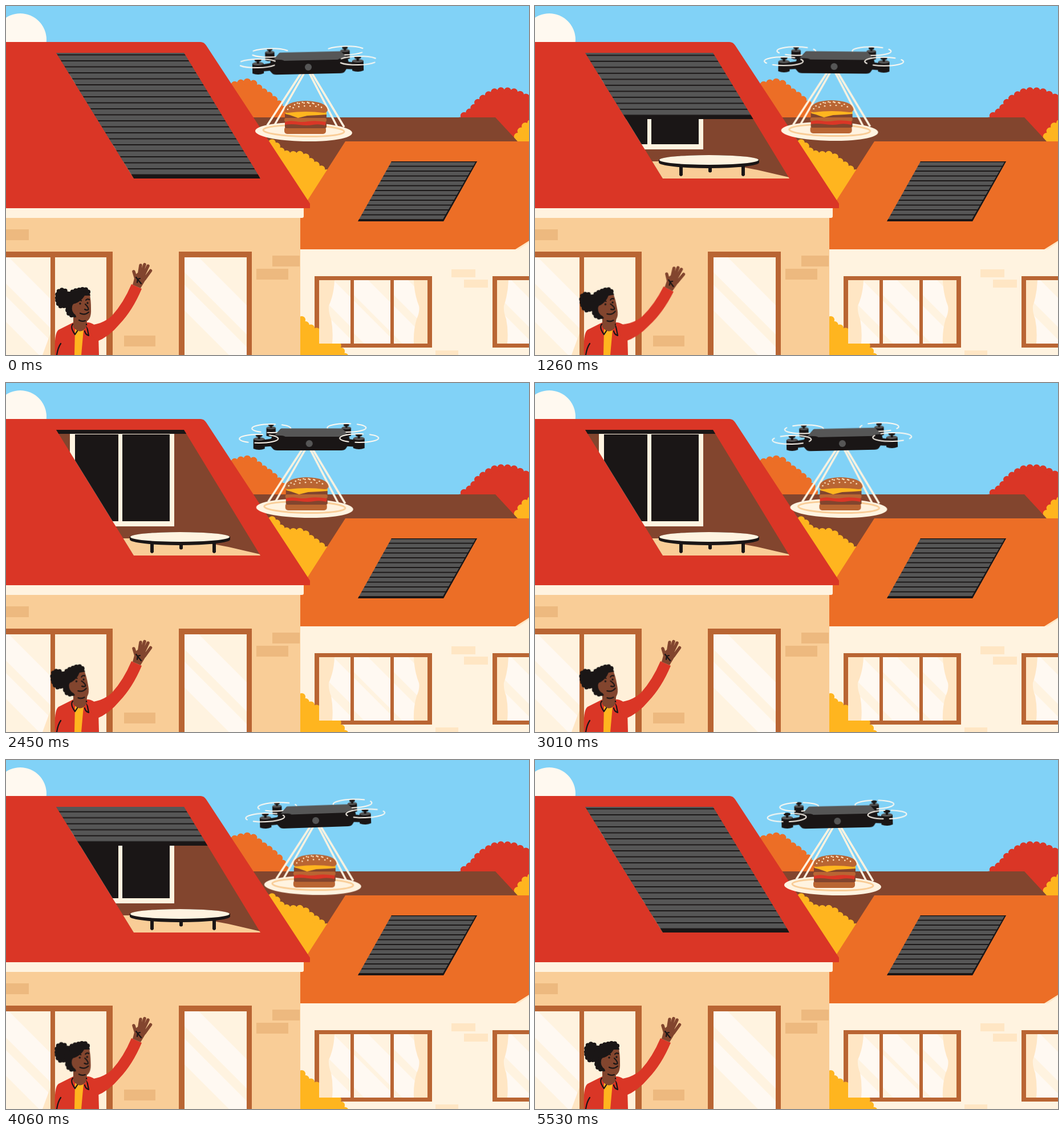
Recreate the animation shown at these times as an HTML page without scripts. Size 917 px wide and 611 px high, loop 5.6 s.

```html
<!DOCTYPE html>
<html lang="en">
<head>
<meta charset="utf-8">
<title>Drone delivery</title>
<style>
  html, body { margin: 0; height: 100%; overflow: hidden; background: #81d2f7; }
  svg { display: block; width: 100vw; height: 100vh; }

  .red { fill: #da3626; } .orange { fill: #ec6e26; } .yellow { fill: #ffb51f; }
  .brown { fill: #82452e; } .wood { fill: #b96533; } .peach { fill: #f9cd97; }
  .cream { fill: #fff3e0; } .white { fill: #fff9f2; } .tan { fill: #edb97f; } .sand { fill: #ffe6c4; }
  .black { fill: #1a1616; } .grey { fill: #565656; }
  .line { fill: none; stroke: #1a1616; stroke-width: 2.2; stroke-linecap: round; stroke-linejoin: round; }
  .rope { fill: none; stroke: #fff3e0; stroke-width: 3.5; }

  /* dotted round stroke gives the scalloped edges */
  .puffy { stroke-width: 13; stroke-linecap: round; stroke-dasharray: 0 11.5; }
  .puffy.red { stroke: #da3626; } .puffy.orange { stroke: #ec6e26; }
  .puffy.yellow { stroke: #ffb51f; }
  .puffy.black { stroke: #1a1616; stroke-width: 8; stroke-dasharray: 0 6; }

  .shade, .drone, .plate { animation: 5.6s linear infinite; }
  .shade { animation-name: shade; }
  .drone { animation-name: drone; transform-origin: 530px 106px; }
  .plate { animation-name: plate; }
  .head { animation: head 5.6s ease-in-out infinite; transform-origin: 129px 553px; }
  .arm { animation: wave 5.6s ease-in-out infinite; transform-origin: 163px 572px; }
  .ring { fill: none; stroke: #fff9f0; stroke-width: 2; stroke-linecap: round;
          stroke-dasharray: 42 8; animation: spin .28s linear infinite; }

  @keyframes shade {
    0%, 2.5%, 97.5%, 100% { transform: none; }
    43.5%, 62.5% { transform: translate(-129px, -213.5px); }
  }
  @keyframes drone {
    0%, 100% { transform: translate(0, 1px) rotate(-1.3deg); }
    12.5% { transform: translate(-3px, 0) rotate(-.3deg); }
    22.5% { transform: translate(-5.5px, 0) rotate(.5deg); }
    32% { transform: translate(-4px, 0) rotate(.6deg); }
    43.75% { transform: translate(1.7px, 0) rotate(0deg); }
    53% { transform: translate(8.5px, 0) rotate(-1.2deg); }
    62.5% { transform: translate(14px, 0) rotate(-2deg); }
    70% { transform: translate(14px, 0) rotate(-2.1deg); }
    82.5% { transform: translate(9.3px, 0) rotate(-1.7deg); }
    91% { transform: translate(4.5px, .5px) rotate(-1.5deg); }
    98.75% { transform: translate(.3px, 1px) rotate(-1.3deg); }
  }
  @keyframes plate {
    0%, 98.75%, 100% { transform: none; }
    12.5% { transform: translate(-3px, -.5px); }
    22.5% { transform: translate(-5.4px, -1px); }
    32% { transform: translate(-4.5px, -1px); }
    43.75% { transform: translate(1.7px, -1px); }
    53% { transform: translate(10px, -1px); }
    62.5% { transform: translate(16px, -1px); }
    70% { transform: translate(16.5px, -1px); }
    82.5% { transform: translate(12.8px, 0); }
    91% { transform: translate(6px, 0); }
  }
  @keyframes head {
    0%, 1.25%, 77%, 100% { transform: none; }
    11.5%, 57% { transform: translate(-1px, 1px) rotate(-10deg); }
  }
  @keyframes wave {
    0%, 1.25%, 42.5%, 100% { transform: none; }
    12%, 32.5% { transform: rotate(-4deg); }
    22.5% { transform: rotate(3.8deg); }
  }
  @keyframes spin { to { stroke-dashoffset: -50; } }
</style>
</head>
<body>
<svg viewBox="0 0 917 611" preserveAspectRatio="none">
  <defs>
    <clipPath id="hole"><path d="M88 82H312L446 302H224Z"/></clipPath>
    <pattern id="slats" y="85.5" width="917" height="10.5" patternUnits="userSpaceOnUse">
      <path class="grey" d="M0 0H917V11H0Z"/><path class="black" d="M0 9.5H917V11.5H0ZM0 0H917V1H0Z"/>
    </pattern>
    <pattern id="thinSlats" y="273" width="917" height="8.5" patternUnits="userSpaceOnUse">
      <path class="grey" d="M0 0H917V9H0Z"/><path class="black" d="M0 6.5H917V8.5H0Z"/>
    </pattern>
    <clipPath id="panes">
      <path d="M0 440H78V611H0ZM313 440H422V611H313ZM549 480H604V591H549ZM610 480H674V591H610ZM680 480H739V591H680ZM861 480H917V591H861Z"/>
    </clipPath>
    <!-- diagonal reflections, anchored at a window's top left corner -->
    <path id="shine" class="white" d="M0 0H25L196 171H145L0 26ZM0 48L123 171H78L0 93Z"/>
    <g id="motor">
      <path class="black" d="M-10 3V20Q0 24 10 20V3Z"/>
      <ellipse class="grey" cy="3" rx="10" ry="3"/>
      <path class="black" d="M-2-1H2V3H-2Z"/>
      <ellipse class="black" cy="-3" rx="6" ry="2.8"/>
    </g>
    <g id="prop">
      <ellipse class="ring" rx="34" ry="7.5" pathLength="100"/>
    </g>
  </defs>

  <!-- sky and background -->
  <path fill="#81d2f7" d="M0 0H917V611H0Z"/>
  <circle fill="#fff9f0" cx="25" cy="59" r="46"/>
  <path class="orange puffy" d="M390 143Q405 136 412 135Q428 130 438 139Q449 150 459 155Q467 162 477 170Q488 181 492 200H400Z"/>
  <path class="red puffy" d="M796 201Q803 189 818 184Q825 167 842 159Q856 147 875 149Q895 149 905 158L925 164V240H850Z"/>
  <path class="yellow puffy" d="M895 240Q896 223 906 217Q911 206 925 204V240Z"/>
  <path class="brown" d="M420 195H858L897 237V300H500Z"/>
  <path class="yellow puffy" d="M455 239L472 240Q478 258 500 261Q522 257 529 269Q544 279 556 288L568 297L530 350Z"/>

  <!-- neighbour's house -->
  <path class="cream" d="M516 400H917V611H516Z"/>
  <path class="sand" d="M893 426L917 409V414L899 426Z"/>
  <path class="orange" d="M595 237H917V411L893 426H516V360Z"/>
  <path fill="url(#thinSlats)" d="M676 272H826L767 377H617Z"/>
  <path class="black" d="M676 272H826L767 377H617L619 373.5H766L823 273.5H675Z"/>
  <path class="sand" d="M781 461H823V475H781ZM803 479H845V493H803ZM753 603H793V611H753Z"/>
  <path class="wood" d="M541 473H747V598H541ZM853 473H917V598H853Z"/>

  <!-- near house -->
  <path class="yellow puffy" d="M508 547H516Q523 553 527 562Q544 565 550 577Q559 587 570 587Q581 591 586 602L596 617H508Z"/>
  <path class="peach" d="M0 365H516V611H0Z"/>
  <path class="cream" d="M0 350H522V368Q522 371 519 371H0Z"/>
  <path class="red" d="M0 63H341Q347 63 351 69L533 346V354H0Z"/>
  <path class="tan" d="M0 391H40V410H0ZM467 437H515V456H467ZM439 460H495V479H439ZM207 577H262V596H207Z"/>
  <path class="wood" d="M0 430H187V611H0ZM303 430H431V611H303Z"/>
  <path fill="#fff0d9" d="M86 440H176V611H86Z"/>

  <g clip-path="url(#panes)">
    <path class="cream" d="M0 430H917V611H0Z"/>
    <use href="#shine" x="-20" y="440"/>
    <use href="#shine" x="313" y="440"/>
    <use href="#shine" x="549" y="480"/>
    <use href="#shine" x="610" y="480"/>
    <use href="#shine" x="680" y="480"/>
    <use href="#shine" x="861" y="480"/>
  </g>
  <path class="sand" d="M64 611L78 573V611ZM549 480H576Q575 505 566 525Q565 535 570 548Q574 568 572 591H549ZM739 480H715Q716 505 724 525Q726 535 720 548Q714 568 715 591H739ZM861 480H881Q880 505 873 525Q872 535 877 548Q881 568 879 591H861Z"/>

  <!-- attic -->
  <g clip-path="url(#hole)">
    <path class="brown" d="M80 80H450V305H80Z"/>
    <path class="cream" d="M112 80H295V251H112Z"/>
    <path class="black" d="M121 90H197V242H121ZM204 90H287V242H204Z"/>
    <path class="peach" d="M190 272H310L390 287L446 300V303H190Z"/>
    <path class="black" d="M253 278H259V296Q256 300 253 296ZM304 280H310V290Q307 293 304 290ZM362 278H368V296Q365 300 362 296Z"/>
    <path class="black" d="M217 270A88 9 0 0 1 393 270V274A88 10 0 0 1 217 274Z"/>
    <ellipse class="cream" cx="305" cy="269.5" rx="87" ry="8.5"/>
    <g class="shade">
      <path fill="url(#slats)" d="M70 75H330L470 302H200Z"/>
      <path class="black" d="M190 295H470V302H190Z"/>
    </g>
  </g>

  <!-- woman -->
  <path class="red" d="M86 611Q84 573 92 567L118 554H145Q161 557 162 575L163 611Z"/>
  <path class="yellow" d="M121 566H136L132 611H120Z"/>
  <path class="brown" d="M118 540H143L141 562Q130 577 118 562Z"/>
  <path class="line" d="M117 557Q112 563 121 575L125 569M141 557L145 577Q139 575 138 569M96 591Q91 598 89 611"/>
  <g class="arm">
    <path class="red" d="M140 559Q168 559 186 542Q206 520 220 487L238 495Q222 533 199 557Q181 579 158 588Z"/>
    <path class="brown" d="M222 488L226 473Q230 464 238 467Q248 470 245 479L236 494Z"/>
    <g fill="none" stroke="#82452e" stroke-width="5.5" stroke-linecap="round">
      <path d="M228 478L224 465M233 473L236 454M237 471L243 452.500M240 474L249 455M243 478L253.500 463.500"/>
    </g>
    <path class="line" d="M228 475L232 480L237 486M230 484L231 478L235 477"/>
  </g>
  <g class="head">
    <path class="black puffy" d="M90 511Q89 497 100 497Q109 500 109 511Q106 526 97 526Q90 523 90 511Z"/>
    <path class="black puffy" d="M107 515Q110 500 124 498Q138 494 143 498Q147 505 140 511L120 542Q108 542 108 530Z"/>
    <path class="brown" d="M121 521Q132 517 138 507H147Q149 514 149 530Q150 550 139 553Q126 554 122 541Q114 535 116 526Q117 521 121 521Z"/>
    <path class="line" d="M125 517Q129 513 132 516M140 515Q143 512 146 514M139 522Q146 529 144 532Q141 533 138 531M130 538Q138 542 145 536M128 550Q133 553 139 551"/>
    <circle class="black" cx="130" cy="521" r="1.7"/><circle class="black" cx="143" cy="520" r="1.7"/>
  </g>

  <!-- delivery -->
  <g class="plate">
    <path class="rope" d="M458 209L521 112M471 208L526 112M593 212L533 112M581 212L529 112"/>
    <g transform="rotate(1.2 522 220)">
      <ellipse class="cream" cx="522" cy="220.500" rx="85" ry="16.500"/>
      <ellipse fill="none" stroke="#f9cd97" stroke-width="3" cx="522" cy="218.500" rx="71" ry="10"/>
    </g>
    <rect class="wood" x="488" y="211" width="73" height="13" rx="5"/>
    <rect class="brown" x="489" y="187" width="73" height="27" rx="3"/>
    <rect class="wood" x="488" y="196" width="74" height="7" rx="3"/>
    <path class="red" d="M489 203Q498 200 508 202T530 202T561 203L560 209Q548 206 538 208T514 208T489 208Z"/>
    <path class="yellow" d="M490 185H562V190L548 191L528 192L512 196L498 191L490 189Z"/>
    <path class="wood" d="M488 183Q489 167 525 166Q562 167 564 182Q563 187 557 187Q526 183 494 187Q488 187 488 183Z"/>
    <g fill="none" stroke="#ffe6c4" stroke-width="2.6" stroke-linecap="round">
      <path stroke-dasharray="0 8.500" d="M498 176Q524 164 554 175"/>
      <path stroke-dasharray="0 10" d="M494 181Q525 170 560 179"/>
      <path stroke-dasharray="0 9" d="M511 170Q525 167 542 171"/>
    </g>
  </g>
  <g class="drone">
    <path class="black" d="M464 86L486 88V98H464ZM594 86L574 88V98H594ZM446 100L474 96V110L446 112ZM613 100L586 96V110L613 112Z"/>
    <use href="#motor" transform="translate(463 76) scale(.82)"/>
    <use href="#motor" transform="translate(595 76) scale(.82)"/>
    <use href="#prop" x="463.500" y="79.500"/>
    <use href="#prop" x="595.500" y="78.500"/>
    <path class="black" d="M469 92L480 80H588L599 92Q602 98 600 106L594 115Q592 118 586 118H474Q468 118 466 115L460 108Q459 98 469 92Z"/>
    <path class="grey" d="M481 79.500H588L598 91Q586 91 582 94H488Q484 91 469 92Z"/>
    <circle class="grey" cx="530" cy="106" r="6"/>
    <use href="#motor" x="442" y="95"/>
    <use href="#motor" x="617" y="94"/>
    <use href="#prop" x="441.500" y="97.500"/>
    <use href="#prop" x="617.500" y="96.500"/>
  </g>
</svg>
</body>
</html>
```
